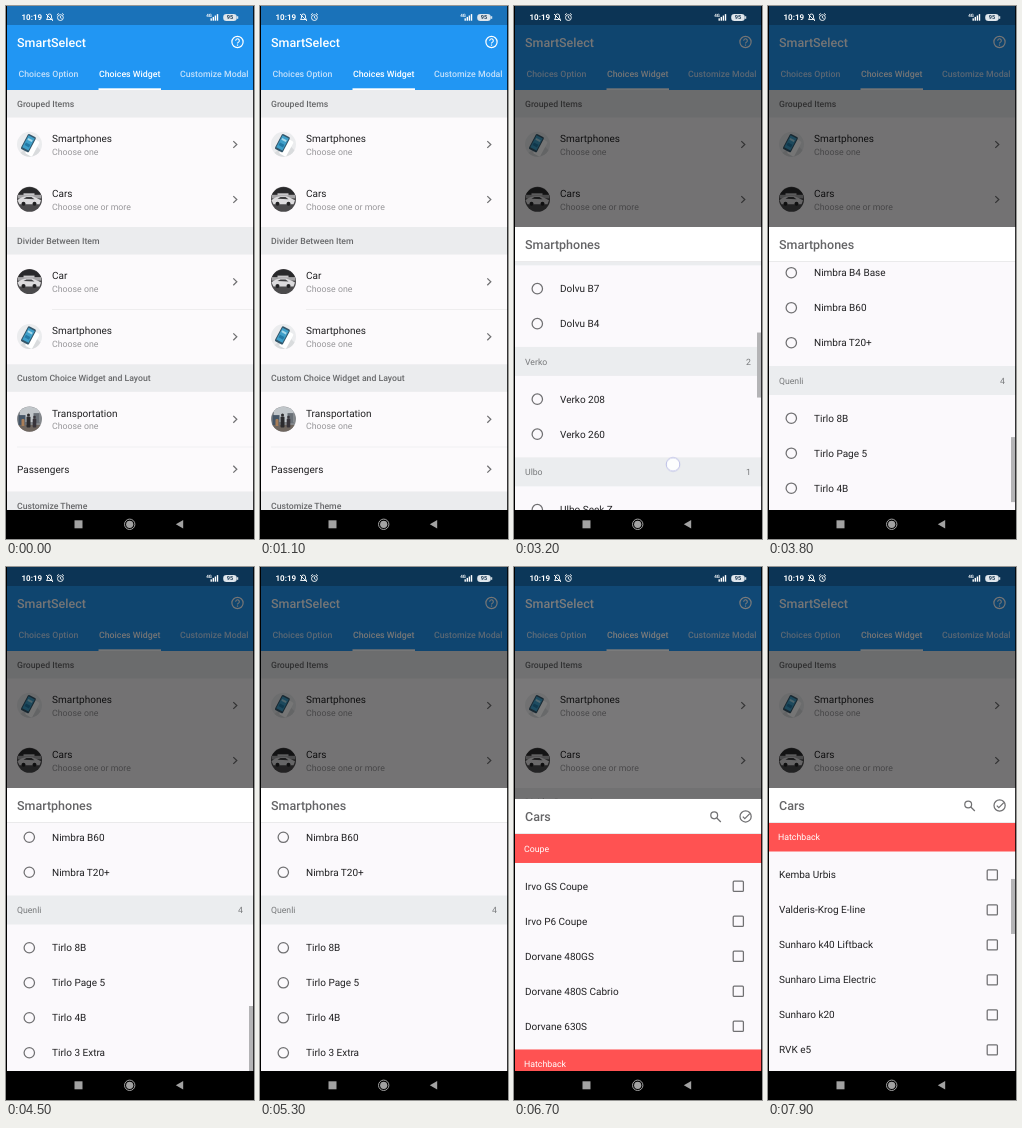
An HTML page that plays this animation: 248 px wide and 533 px high, repeating every 8000 ms.

```html
<!DOCTYPE html>
<html lang="en">
<head>
<meta charset="utf-8">
<title>SmartSelect</title>
<style>
@property --s { syntax: "<number>"; inherits: true; initial-value: 0; }
html, body { margin: 0; width: 100%; height: 100%; overflow: hidden; background: #000; }
svg { display: block; }
#stage { width: 248px; height: 533px; }
text { font: 400 10px Roboto, sans-serif; fill: #202022; text-rendering: geometricPrecision; }
.title { font-size: 12.5px; font-weight: 500; fill: #fff; }
.tab { font-size: 8.78px; font-weight: 500; fill: #fff; }
.off { fill: #c3e0fb; }
.band { font-size: 8.7px; font-weight: 500; fill: #67686a; }
.sub { font-size: 8.78px; fill: #98979a; }
.head { font-size: 12.5px; font-weight: 500; fill: #656567; }
.group { font-size: 8.7px; fill: #77797b; }
.red { font-size: 8.76px; fill: #fff; }
.count { text-anchor: end; }
.clock { font-size: 8px; font-weight: 700; fill: #fff; }
.tiny { font-size: 4.5px; font-weight: 700; fill: #fff; text-anchor: middle; }
.charge { font-size: 5.6px; fill: #23405a; }
.line { fill: none; stroke-width: 1.25; stroke: #707072; }

.scrim, .sheet, .scroller, .thumb, .touch { animation: 8s linear infinite; }
.scrim { animation-name: dim; }
.phones { animation-name: phones; }
.cars { animation-name: cars; }
.phones .scroller { animation-name: scrollPhones; }
.cars .scroller { animation-name: scrollCars; }
.list { transform: translateY(calc(var(--s) * -1px)); }
.phones .thumb { animation-name: barPhones; }
.cars .thumb { animation-name: barCars; }
.phones .bar { transform: translateY(calc(var(--s) * .2505px)); }
.cars .bar { transform: translateY(calc(var(--s) * .259px)); }
.touch { animation-name: touch; }

@keyframes dim {
  0%, 16.77% { opacity: 0; animation-timing-function: cubic-bezier(0, 0, .2, 1); }
  21.15%, 66.25% { opacity: .54; }
  69.375%, 80.52% { opacity: 0; animation-timing-function: cubic-bezier(0, 0, .2, 1); }
  84.9%, 100% { opacity: .54; }
}
@keyframes phones {
  0%, 16.77% { transform: translateY(283px); animation-timing-function: cubic-bezier(0, 0, .2, 1); }
  21.15% { transform: none; }
  66.25% { transform: none; animation-timing-function: cubic-bezier(.4, 0, 1, 1); }
  69.375%, 100% { transform: translateY(283px); }
}
@keyframes cars {
  0%, 80.52% { transform: translateY(283px); animation-timing-function: cubic-bezier(0, 0, .2, 1); }
  84.9%, 100% { transform: none; }
}
@keyframes scrollPhones {
  0%, 28.75% { --s: 0; }
  31.25% { --s: 85; animation-timing-function: cubic-bezier(.2, .5, .5, 1); }
  38.75%, 40% { --s: 281; }
  42.5% { --s: 401; animation-timing-function: cubic-bezier(.2, .4, .5, 1); }
  50%, 100% { --s: 730.5; }
}
@keyframes scrollCars {
  0%, 93.5% { --s: 0; }
  96.25% { --s: 110; animation-timing-function: ease-out; }
  98.75%, 100% { --s: 216; }
}
@keyframes barPhones {
  0%, 28.75% { opacity: 0; }
  30%, 57.5% { opacity: 1; }
  61.25%, 100% { opacity: 0; }
}
@keyframes barCars {
  0%, 93.5% { opacity: 0; }
  95%, 100% { opacity: 1; }
}
@keyframes touch {
  0%, 11.24% { transform: translate(122.5px, 133.5px); opacity: 0; }
  11.25%, 13.74% { transform: translate(122.5px, 133.5px); opacity: 1; }
  13.75%, 28.74% { transform: translate(159px, 455px); opacity: 0; }
  28.75% { transform: translate(159px, 455px); opacity: 1; }
  31.25% { transform: translate(160px, 370px); opacity: 1; }
  31.26%, 39.5% { transform: translate(159px, 459px); opacity: 0; }
  39.51%, 40% { transform: translate(159px, 459px); opacity: 1; }
  42.5% { transform: translate(160px, 339px); opacity: 1; }
  42.51%, 77.4% { transform: translate(122.5px, 192px); opacity: 0; }
  77.41%, 79.4% { transform: translate(122.5px, 192px); opacity: 1; }
  79.41%, 93.6% { transform: translate(159px, 450px); opacity: 0; }
  93.61% { transform: translate(159px, 450px); opacity: 1; }
  96.25% { transform: translate(160px, 340px); opacity: 1; }
  96.26%, 100% { transform: translate(160px, 340px); opacity: 0; }
}
</style>
</head>
<body>
<svg id="stage" viewBox="0 0 248 533"></svg>
<script>
const W = 248;
const SHEET = 221, LIST = 256, NAV = 504;
const HEAD = 29, PAD = 5.75, ROW = 35;

// y is the middle of the capitals
const text = (x, y, str, cls = "") => `<text x="${x}" y="${y}" dy=".355em" class="${cls}">${str}</text>`;
const rect = (x, y, w, h, fill, more = "") => `<rect x="${x}" y="${y}" width="${w}" height="${h}" fill="${fill}" ${more}/>`;
const circle = (x, y, r, attrs) => `<circle cx="${x}" cy="${y}" r="${r}" ${attrs}/>`;
const path = (d, attrs) => `<path d="${d}" ${attrs}/>`;
const at = (x, y, body) => `<g transform="translate(${x} ${y})">${body}</g>`;

const art = {
  phone: circle(0, 0, 12.5, 'fill="#ebecee"') +
    path("M-9 8.5A12.5 12.5 0 0 0 11 6L4 -1Z", 'fill="#d9dbdd"') +
    `<g transform="rotate(28)">${rect(0, -7, 8, 17, "#fff", 'rx="1.5"')}` +
    `${rect(-6, -9, 9, 17, "#34566a", 'rx="1.5"')}${rect(-5, -7.5, 7, 13.5, "#3f9fc9")}` +
    `${rect(-4, -5, 5, 2, "#a5d8ea")}${rect(-4, 0, 5, 3, "#2379a5")}</g>`,
  car: circle(0, 0, 12.5, 'fill="#4b4a4c"') +
    path("M-12 -3A12.5 12.5 0 0 1 12 -3Z", 'fill="#29292b"') +
    rect(-11.5, -4.5, 23, 3.5, "#a3a2a4") + rect(-6, -6, 11, 2, "#c8c7c9") +
    path("M-12 1Q-8 -3 -2 -3H3Q8 -1 11.5 1L10 5H-10Z", 'fill="#dcdbdd"') +
    path("M-6 -.5L-3 -2.2H2L5 0Z", 'fill="#3c3c3e"') +
    circle(-6, 4.5, 2, 'fill="#202022"') + circle(5, 4.5, 2, 'fill="#202022"'),
  street: circle(0, 0, 12.5, 'fill="#85888c"') +
    path("M-9.5 -8A12.5 12.5 0 0 1 10 -7.5V3H-9.5Z", 'fill="#c1c6ca"') +
    rect(-11, -4, 7, 10, "#455566") + rect(4, -6, 6, 10, "#6a7077") +
    path("M-11 6H11A12.5 12.5 0 0 1 -11 6Z", 'fill="#6f665f"') +
    circle(-1, -4, 1.5, 'fill="#2b2a2d"') + rect(-3, -2.5, 4, 11, "#2b2a2d", 'rx="1"') +
    circle(5, -2, 1.3, 'fill="#38343a"') + rect(3.2, -.7, 3.6, 9, "#38343a", 'rx="1"') +
    rect(-8, 0, 3, 7, "#a97e58", 'rx="1"')
};

const chevron = y => path(`M227.3 ${y - 3.4}l3.5 3.4l-3.5 3.4`, 'class="line"');
const band = (y, label) => rect(0, y, W, 27.5, "#ebecee") + text(11, y + 14, label, "band");
const tile = (y, pic, name, hint) => at(23.5, y + 27.3, art[pic]) +
  text(46, y + 21.5, name) + text(46, y + 34.4, hint, "sub") + chevron(y + 27.5);

const help = circle(231.5, 36, 5.6, 'fill="none" stroke="#fff" stroke-width="1.2"') +
  path("M229.7 34.7a1.8 1.8 0 1 1 2.8 1.4q-1 .6 -1 1.4", 'fill="none" stroke="#fff" stroke-width="1.1"') +
  rect(230.9, 38.5, 1.2, 1.2, "#fff");

const page = rect(0, 0, W, NAV, "#fcfafc") +
  rect(0, 0, W, 19, "#1a72b9") + rect(0, 19, W, 65, "#2196f3") +
  text(11, 36.3, "SmartSelect", "title") + help +
  text(12.5, 68, "Choices Option", "tab off") +
  text(93, 68, "Choices Widget", "tab") +
  text(174, 68, "Customize Modal", "tab off") +
  rect(92.5, 82.3, 62.5, 1.7, "#fff") +
  band(84, "Grouped Items") +
  tile(111, "phone", "Smartphones", "Choose one") +
  tile(166, "car", "Cars", "Choose one or more") +
  band(221, "Divider Between Item") +
  tile(248.3, "car", "Car", "Choose one") +
  rect(46, 303, 202, .6, "#e6e5e7") +
  tile(303.3, "phone", "Smartphones", "Choose one") +
  band(358.3, "Custom Choice Widget and Layout") +
  tile(385.8, "street", "Transportation", "Choose one") +
  rect(11, 440.7, 237, .6, "#e9e8ea") +
  text(11, 463.2, "Passengers") + chevron(463.2) +
  band(485.5, "Customize Theme");

const radio = y => circle(23.3, y, 5.2, 'class="line"');
const check = y => rect(219.2, y - 5, 10.2, 10.2, "none", 'rx="1" class="line"');

function list(groups, isCars) {
  let y = 0, out = "";
  for (const [name, items] of groups) {
    out += rect(0, y, W, HEAD, isCars ? "#ff5252" : "#ebedef") +
      text(isCars ? 10 : 11, y + 14.7, name, isCars ? "red" : "group");
    if (!isCars) out += text(237, y + 14.7, items.length, "group count");
    y += HEAD + PAD;
    for (const item of items) {
      const mid = y + ROW / 2;
      out += isCars ? text(11, mid, item) + check(mid) : radio(mid) + text(46, mid, item);
      y += ROW;
    }
    y += PAD;
  }
  return out;
}

function sheet(cls, title, groups, thumb) {
  const isCars = cls === "cars";
  const icons = circle(200.2, 237.4, 3.4, 'class="line"') + path("M202.8 240l4 4", 'class="line"') +
    circle(231.6, 238.5, 5.6, 'class="line"') + path("M228.8 238.6l2 2l5 -5", 'class="line"');
  return `<g class="sheet ${cls}">${rect(0, SHEET, W, NAV - SHEET, "#fff")}
    ${text(11, 238.6, title, "head")}${isCars ? icons : ""}
    <svg y="${LIST}" width="${W}" height="${NAV - LIST}"><g class="scroller">
      ${rect(0, 0, W, NAV - LIST, "#fbf9fc")}
      <g class="list">${list(groups, isCars)}</g>
      <g class="thumb">${rect(243, 0, 4, thumb, "#b4b4b6", 'class="bar"')}</g>
    </g></svg>${rect(0, LIST - .6, W, .6, "#dcdcde")}</g>`;
}

const phones = [
  ["Orvel", ["uVerna 12 Pro", "uVerna ZR", "uVerna ZS", "uVerna ZS Max"]],
  ["Tauvel", ["Tauvel K20 Pro"]],
  ["Dolvu", ["Dolvu B7", "Dolvu B4"]],
  ["Verko", ["Verko 208", "Verko 260"]],
  ["Ulbo", ["Ulbo Seek Z"]],
  ["Kelvorn", ["Kelvorn Arch 5", "Nimbra B30t", "Nimbra B40t", "Nimbra B4 Base", "Nimbra B60", "Nimbra T20+"]],
  ["Quenli", ["Tirlo 8B", "Tirlo Page 5", "Tirlo 4B", "Tirlo 3 Extra"]]
];
const cars = [
  ["Coupe", ["Irvo GS Coupe", "Irvo P6 Coupe", "Dorvane 480GS", "Dorvane 480S Cabrio", "Dorvane 630S"]],
  ["Hatchback", ["Kemba Urbis", "Valderis-Krog E-line", "Sunharo k40 Liftback", "Sunharo Lima Electric", "Sunharo k20", "RVK e5"]]
];

const white = 'fill="none" stroke="#fff" stroke-width=".9"';
const status = text(15.5, 11.3, "10:19", "clock") +
  path("M40.5 13.5h6l-1 -1.5v-2a2 2 0 0 0 -4 0v2ZM40 8l7 7", white) +
  circle(54.4, 11.6, 2.9, white) + path("M54.4 10v1.8l1.3 .6M50.9 9l1.8 -1.7M57.9 9l-1.8 -1.7", white) +
  text(203, 9, "4G", "tiny") +
  [0, 1, 2, 3].map(i => rect(204.5 + i * 2.1, 12.3 - i * 1.4, 1.4, 2.4 + i * 1.4, "#fff")).join("") +
  rect(217.2, 8, 13.6, 7, "#dfe6ec", 'rx="3.2"') +
  rect(231.2, 10.2, 1, 2.6, "#fff") + text(224, 11.5, "95", "tiny charge");

const nav = rect(0, NAV, W, 29, "#000") + rect(68.5, 514.3, 8, 8, "#a2a2a2") +
  circle(123.7, 518.3, 5.2, 'fill="none" stroke="#a2a2a2"') + circle(123.7, 518.3, 3.6, 'fill="#a2a2a2"') +
  path("M169.8 518.3l7.4 -4.3v8.6Z", 'fill="#a2a2a2"');

document.getElementById("stage").innerHTML = page +
  rect(0, 0, W, NAV, "#000", 'class="scrim"') +
  sheet("phones", "Smartphones", phones, 65) +
  sheet("cars", "Cars", cars, 55) +
  status + nav +
  `<g class="touch">${circle(0, 0, 6.8, 'fill="#fff" fill-opacity=".9" stroke="#b9bce6" stroke-width="1"')}</g>` +
  rect(0, 0, 1, 533, "#000") + rect(247.2, 0, .8, 533, "#000");
</script>
</body>
</html>
```
